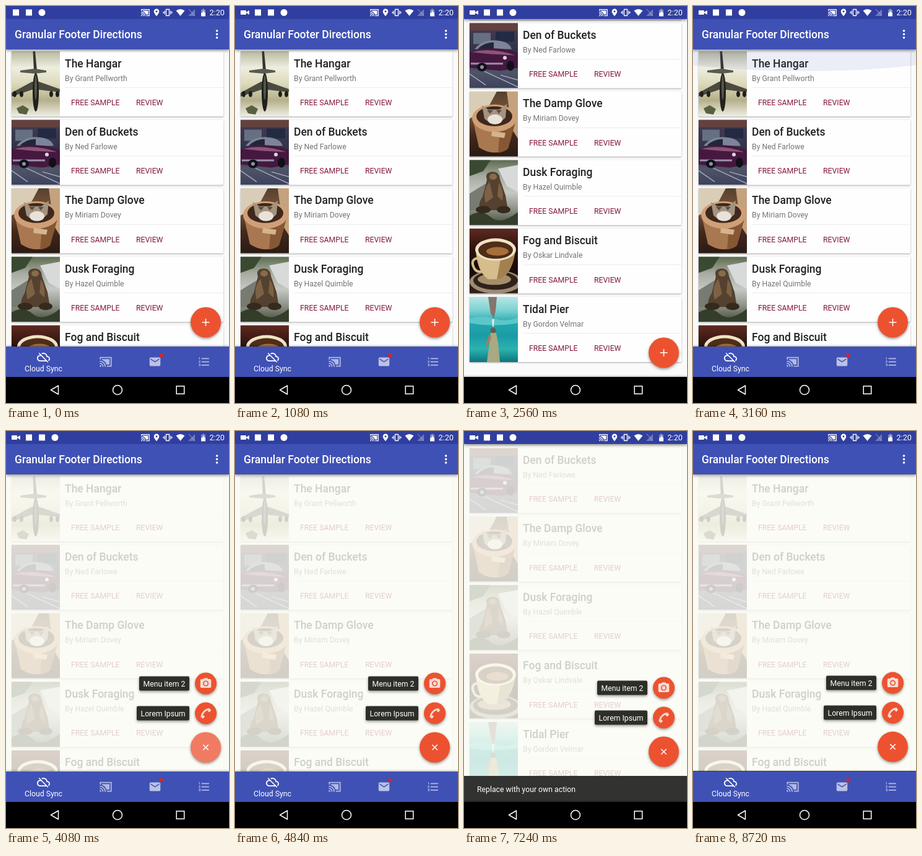
Recreate the animation shown at these times as an HTML page. Size 360x640 px, loop 8760 ms.

```html
<!DOCTYPE html>
<html lang="en">
<head>
<meta charset="utf-8">
<title>Book list</title>
<style>
  html, body { margin: 0; width: 100%; height: 100%; overflow: hidden; background: #000; }
  svg { display: block; }
  text { font: 12.25px Roboto, Arial, sans-serif; white-space: pre; }
  .head { font-size: 17.5px; font-weight: 500; }
  .card { filter: drop-shadow(0 1px 1.2px #0005); }
  .lift { filter: drop-shadow(0 2px 2px #0006); }
  .rise { filter: drop-shadow(0 -1px 1.5px #0005); }
  .line { fill: none; stroke: #fff; }
</style>
</head>
<body>
<svg id="stage" width="360" height="640" viewBox="0 0 360 640"></svg>
<script>
const LOOP = 8760, PITCH = 110.4, BAR = 49, SNACK = 42;
const ORANGE = '#ec5230', INDIGO = '#3f51b5', ACCENT = '#85183c';

const rect = (x, y, w, h, fill, more = '') =>
  `<rect x="${x}" y="${y}" width="${w}" height="${h}" fill="${fill}" ${more}/>`;
const disc = (x, y, r, fill, more = '') =>
  `<circle cx="${x}" cy="${y}" r="${r}" fill="${fill}" ${more}/>`;
const oval = (x, y, rx, ry, fill, more = '') =>
  `<ellipse cx="${x}" cy="${y}" rx="${rx}" ry="${ry}" fill="${fill}" ${more}/>`;
const path = (d, fill, more = '') => `<path d="${d}" fill="${fill}" ${more}/>`;
const line = (d, color, width) => path(d, 'none', `stroke="${color}" stroke-width="${width}"`);
const text = (x, y, s, fill, more = '') => `<text x="${x}" y="${y}" fill="${fill}" ${more}>${s}</text>`;
const group = (id, body, more = '') => `<g id="${id}" ${more}>${body}</g>`;
// Thumbnail backdrop: a vertical blend of evenly spaced colours.
const backdrop = (id, ...colors) => `<linearGradient id="${id}" x2="0" y2="1">`
  + colors.map((c, i) => `<stop offset="${i / (colors.length - 1)}" stop-color="${c}"/>`).join('')
  + '</linearGradient>' + rect(0, 0, 78, 105, `url(#${id})`);
// Icons use a 24-unit grid and are placed by their centre.
const icon = (x, y, size, body, opacity = 1) =>
  `<g transform="translate(${x - size / 2} ${y - size / 2}) scale(${size / 24})" fill="#fff" opacity="${opacity}">${body}</g>`;

const cloudOff = path('M19.35 10.04C18.67 6.59 15.64 4 12 4c-1.48 0-2.85.43-4.01 1.17l1.46 1.46C10.21 6.23 11.08 6 12 6c3.04 0 5.5 2.46 5.5 5.5v.5H19c1.66 0 3 1.34 3 3 0 1.13-.64 2.11-1.56 2.62l1.45 1.45C23.16 18.16 24 16.68 24 15c0-2.64-2.05-4.78-4.65-4.96zM3 5.27l2.75 2.74C2.56 8.15 0 10.77 0 14c0 3.31 2.69 6 6 6h11.73l2 2L21 20.73 4.27 4zM7.73 10l8 8H6c-2.21 0-4-1.79-4-4s1.79-4 4-4z', '#fff');
const cast = line('M2 8V4H22V20H14M1 11a10 10 0 0 1 10 10M1 15a6 6 0 0 1 6 6', '#fff', 2)
  + path('M1 18v3h3a3 3 0 0 0-3-3zM5 7H19V17H13.4A13 13 0 0 0 5 8.6z', '#fff');
const mail = path('M4 4H20a2 2 0 0 1 2 2V18a2 2 0 0 1-2 2H4a2 2 0 0 1-2-2V6a2 2 0 0 1 2-2zM20 6l-8 5-8-5v2l8 5 8-5z', '#fff', 'fill-rule="evenodd"');
const numbers = path('M2 17h2v.5H3v1h1v.5H2v1h3v-4H2zm1-9h1V4H2v1h1zm-1 3h1.8L2 13.1v.9h3v-1H3.2L5 10.9V10H2zm5-6v2h14V5zm0 14h14v-2H7zm0-6h14v-2H7z', '#fff');
const camera = path('M9 2L7.2 4H4a2 2 0 0 0-2 2V18a2 2 0 0 0 2 2H20a2 2 0 0 0 2-2V6a2 2 0 0 0-2-2H16.8L15 2z', '#f6dcd3')
  + disc(12, 12, 5.2, ORANGE) + disc(12, 12, 3.3, '#f6dcd3');
const phone = line('M4.5 19.5C4 12 12 4 19.5 4.5', '#f6dcd3', 3.2)
  + line('M5 20.5l4-3.6M20.5 5l-3.6 4', '#f6dcd3', 4.2);

const thumbs = [
  // aircraft
  backdrop('sky', '#b9b8a0', '#eeeee0', '#dcd9ba', '#b5b08a', '#efeee6')
  + path('M8 92l10-5 10 6-4 9-12-2z', '#58613f') + path('M34.500 0h3.500l3 32h-5z', '#34352f')
  + path('M14 31l23-3 19 3v3l-19 2-23-2z', '#5a5a4e')
  + path('M0 67l33-18h11l34 12v5l-34-4H33L0 73z', '#4a4a40')
  + oval(39, 66, 5, 31, '#20211d') + oval(39, 58, 2, 20, '#56574c')
  + [5, 16, 64, 74].map(x => oval(x, 69, 3, 5, '#1d1e1b')).join(''),
  // car
  backdrop('lot', '#4b3a4c', '#39384f', '#2e3148', '#505468', '#3c425c')
  + rect(0, 0, 78, 12, '#63413f') + rect(6, 16, 28, 18, '#667083') + rect(42, 14, 30, 16, '#232a44')
  + line('M0 82L26 100M24 78L78 103M50 84l28 8', '#a3a9bd', 1.5)
  + path('M8 42Q20 27 42 28T68 42z', '#7d8499') + path('M13 42q10-11 26-11v11z', '#232538')
  + path('M0 48Q16 39 44 41T78 50V72L50 77 0 72z', '#45183f') + path('M4 47q30-8 70 5l-40-2z', '#8a5578')
  + rect(2, 64, 52, 3, '#9a92ab') + oval(20, 71, 8, 7, '#101019') + disc(20, 71, 3, '#8f90a0')
  + oval(66, 69, 6, 8, '#101019') + disc(57, 56, 3, '#d8d6de'),
  // pot
  backdrop('room', '#57402f', '#7a563a', '#43291b', '#2a1a14')
  + path('M0 0h44L30 26 0 44z', '#d9cdb8') + path('M60 0H78V76L68 60z', '#c4a27d')
  + path('M5 44L15 90Q38 106 62 92L75 46z', '#a97850') + path('M50 52L46 99Q58 97 62 92L75 46z', '#855735')
  + oval(40, 43, 36, 22, '#cfa077') + oval(40, 40, 29, 16, '#3f281c')
  + path('M20 22l10 7h18l12-9-2 22q-16 18-34 2z', '#a3937f') + oval(41, 45, 12, 8, '#e9e2d8')
  + path('M28 30l5 6 5-6zM43 30l4 6 5-6z', '#5c4e42') + path('M36 64l22 3-2 8-21-3z', '#d5b48d'),
  // animal on rocks
  backdrop('rocks', '#5d6b4e', '#a6aba0', '#c6c8c4', '#8d9287', '#454d3b')
  + path('M0 0h34L22 18 0 26z', '#394a31') + path('M46 14l32-6v44L60 42z', '#d8dad9')
  + path('M0 54l26-16 8 40-34 4z', '#777b72') + path('M0 90q18-12 34 2t44-8v21H0z', '#343d2a')
  + path('M28 32Q24 20 36 19t13 12l9 26 4 24H18q-6-8 3-22z', '#54412f')
  + path('M32 35q-12 16-6 34l12-9zM47 36q9 14 6 30l-8-8z', '#7c6144')
  + oval(38, 27, 6, 5, '#896b4d') + oval(22, 80, 12, 6, '#36291d') + oval(55, 80, 11, 6, '#36291d'),
  // cup
  backdrop('table', '#5d2a20', '#2a110d', '#170c0a', '#33231c')
  + oval(42, 86, 42, 19, '#9d8b72') + oval(42, 84, 36, 15, '#2f221b') + oval(40, 82, 27, 9, '#a58e6b')
  + path('M10 34Q12 70 30 82H50Q70 70 74 34z', '#d6bd8b') + path('M50 50L44 82h6Q70 70 74 34z', '#a3804f')
  + line('M12 48q-10 2-6 13t14 8', '#d6bd8b', 4)
  + oval(42, 34, 33, 18, '#efe3c4') + oval(42, 35, 28, 14, '#4f2d16') + oval(45, 37, 18, 7, '#a66f3c'),
  // water
  backdrop('sea', '#b8e6e4', '#7ed3d3', '#22a7af', '#1b9ba4', '#2bb3b0', '#0e747c')
  + path('M0 35q20-6 40 0t38-2v9q-40 7-78 0z', '#5cc7c8')
  + path('M30 0h14l-2 22-3 14-5-10z', '#86756c') + path('M36 36l4 0-1 12h-2z', '#d8ecea')
  + disc(38, 54, 4.5, '#6b5b4a') + path('M34 58h9l3 16 3 31H28l4-30z', '#a9a982') + path('M32 60l-7 18 4 2 6-14z', '#9b8068')
];

const books = [
  ['The Hangar', 'Grant Pellworth'], ['Den of Buckets', 'Ned Farlowe'],
  ['The Damp Glove', 'Miriam Dovey'], ['Dusk Foraging', 'Hazel Quimble'],
  ['Fog and Biscuit', 'Oskar Lindvale'], ['Tidal Pier', 'Gordon Velmar']
];

const card = ([title, author], i) => `<g class="card" transform="translate(9 ${73 + i * PITCH})">`
  + rect(0, 0, 342, 105, '#fefefe', 'rx="1.5"')
  + `<svg width="78" height="105">${thumbs[i]}</svg>`
  + text(86, 25.5, title, '#212121', 'class="head"')
  + text(86, 47.5, 'By ' + author, '#757575')
  + rect(86, 58, 256, 1, '#ececec')
  + text(96, 87, 'FREE SAMPLE', ACCENT) + text(201, 87, 'REVIEW', ACCENT) + '</g>';

const menuItem = (id, y, x, label, glyph) => group(id,
  `<g class="lift">${rect(x, y - 11.5, 296 - x, 23, '#2e2e29', 'rx="2"')}</g>`
  + disc((x + 296) / 2, y, 18, '#fff', 'class="glow" opacity="0" clip-path="inset(6px 0)"')
  + text((x + 296) / 2, y + 4.5, label, '#fff', 'text-anchor="middle"')
  + `<g class="mini"><g class="lift">${disc(322.5, y, 17.5, ORANGE)}</g>${icon(322.5, y, 21, glyph)}`
  + disc(322.5, y, 17.5, '#fff', 'class="glow" opacity="0"') + '</g>');

const status = rect(0, 0, 360, 21, '#303f9f')
  + group('video', rect(9, 7, 9, 7, '#fff', 'rx="1"') + path('M18 10l5-3v7l-5-3z', '#fff'))
  + group('notes', rect(11, 5.5, 10, 10, '#fff') + rect(32, 5.5, 10, 10, '#fff') + disc(58, 10.5, 5.5, '#fff'))
  + icon(225, 10.5, 15, cast)
  + path('M243 4.5a4.3 4.3 0 0 0-4.3 4.3c0 3 4.3 7.7 4.3 7.7s4.3-4.7 4.3-7.7a4.3 4.3 0 0 0-4.3-4.3zm0 2.8a1.5 1.5 0 1 1 0 3 1.5 1.5 0 0 1 0-3z', '#fff')
  + line('M258.5 5.5h5v10h-5zM256.3 7.5v6M265.7 7.5v6M254.3 9v3M267.7 9v3', '#fff', 1.3)
  + path('M281.5 16l-7-8.5q7-5 14 0z', '#fff')
  + path('M305 5v11H294z', '#fff', 'opacity=".3"') + line('M295 5l10 11', '#98a1d0', 1)
  + path('M315 6h2V4.5h3V6h2v10.500h-7z', '#fff', 'opacity=".4"') + path('M315 11h7v5.500h-7z', '#fff')
  + path('M319.5 6.500l-3 5h2v3.500l3-5h-2z', '#fff')
  + text(328.5, 15, '2:20', '#fff', 'style="font-size:12.6px"');

const $ = id => document.getElementById(id);
$('stage').innerHTML = rect(0, 0, 360, 640, '#fafafa')
  + group('list', books.map(card).join(''))
  + oval(180, 70, 260, 35, INDIGO, 'id="edge"')
  + rect(0, 21, 360, 577, '#fcfcf4', 'id="veil"')
  + group('appbar', rect(0, 21, 360, BAR, INDIGO) + text(14, 52, 'Granular Footer Directions', '#fff', 'class="head"')
    + [40, 45.5, 51].map(y => disc(340.5, y, 1.8, '#fff')).join(''), 'class="lift"')
  + group('snack', rect(0, 549, 360, SNACK + 8, '#323230') + text(21, 574.5, 'Replace with your own action', '#fff'))
  + group('nav', rect(0, 549, 360, BAR, INDIGO, 'class="rise"')
    + icon(60.5, 566, 21, cloudOff) + text(60.5, 589, 'Cloud Sync', '#fff', 'text-anchor="middle"')
    + icon(161, 573.5, 21, cast, .6) + icon(240.5, 573.5, 21, mail, .65) + icon(320, 573.5, 21, numbers, .6)
    + disc(250.5, 563, 3.2, '#d8222a'))
  + group('fab', menuItem('camera', 407, 215, 'Menu item 2', camera) + menuItem('phone', 455, 211, 'Lorem Ipsum', phone)
    + `<g class="lift">${disc(322.5, 510, 24.5, ORANGE)}</g>`
    + disc(322.5, 510, 24.5, '#fff', 'id="press"')
    + path('M316.5 510h12M322.5 504v12', 'none', 'id="plus" stroke="#fff" stroke-width="1.5"'))
  + status
  + rect(0, 598, 360, 42, '#000')
  + path('M84.5 612v14l-12-7z', 'none', 'class="line" stroke-width="1.5" stroke-linejoin="round"')
  + disc(180, 619, 7.5, 'none', 'class="line" stroke-width="1.5"')
  + rect(275.2, 612.8, 12.5, 12.5, 'none', 'class="line" stroke-width="1.5"');

const clamp = p => Math.min(1, Math.max(0, p));
const part = (t, start, length) => clamp((t - start) / length);
const out = (t, start, length) => 1 - (1 - part(t, start, length)) ** 3;
const back = p => 1 + 2.7 * (p - 1) ** 3 + 1.7 * (p - 1) ** 2;
const move = (id, y) => $(id).setAttribute('transform', `translate(0 ${y})`);
const fade = (el, v) => el.setAttribute('opacity', v);

function popItem(id, y, p) {
  fade($(id), p > 0 ? 1 : 0);
  const s = Math.max(.001, back(p));
  $(id).querySelector('.mini').setAttribute('transform', `translate(322.5 ${y}) scale(${s}) translate(-322.5 ${-y})`);
}

function draw(t) {
  const scroll = 156 * (out(t, 1780, 595) - out(t, 2620, 380) + out(t, 6680, 500) - out(t, 7700, 450));
  const hide = BAR * (out(t, 1900, 390) - out(t, 2640, 300) + out(t, 6760, 300) - out(t, 7720, 300));
  const snack = SNACK * (out(t, 6040, 250) - out(t, 8490, 320));
  move('list', -scroll);
  move('appbar', -Math.min(scroll, BAR));
  move('nav', hide);
  move('snack', hide - snack);
  move('fab', hide - snack);
  fade($('snack'), snack > .01 ? 1 : 0);
  fade($('edge'), .13 * (part(t, 2880, 120) - part(t, 3060, 400)));

  fade($('veil'), .8 * part(t, 3760, 300));
  popItem('phone', 455, part(t, 3780, 200));
  popItem('camera', 407, part(t, 3830, 200));
  $('plus').setAttribute('transform', `rotate(${135 * back(part(t, 3760, 300))} 322.5 510)`);
  fade($('press'), .24 * (part(t, 3700, 120) - part(t, 4090, 300)));
  const tap = part(t, 5820, 90) - part(t, 5950, 250);
  const [labelGlow, discGlow] = $('camera').querySelectorAll('.glow');
  fade(labelGlow, .16 * tap);
  fade(discGlow, .22 * tap);

  fade($('video'), t < 240 ? 0 : 1);
  $('notes').setAttribute('transform', `translate(${t < 240 ? 0 : 21} 0)`);
}

const begin = performance.now();
function tick() {
  draw((performance.now() - begin) % LOOP);
  requestAnimationFrame(tick);
}
tick();
</script>
</body>
</html>
```
